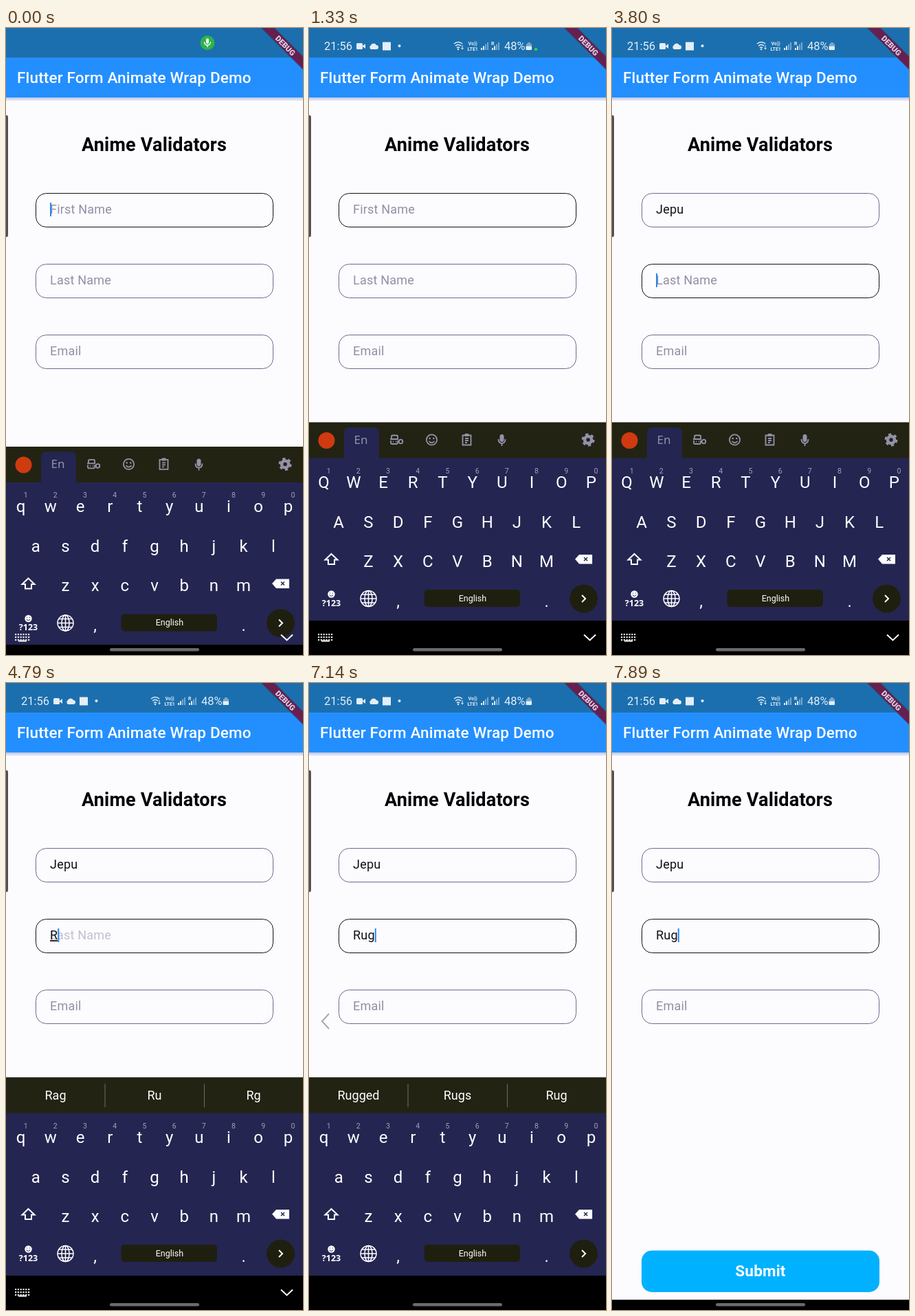
These frames come from a looping animation (432x912 px, 8000 ms). An HTML page:

```html
<!DOCTYPE html>
<html lang="en">
<head>
<meta charset="utf-8">
<title>Form demo</title>
<style>
  html, body { margin: 0; width: 100%; height: 100%; overflow: hidden; background: #fcfcff; }
  svg { display: block; width: 100vw; height: 100vh; font-family: Roboto, sans-serif; }
  text { white-space: pre; }
  .mid { text-anchor: middle; }
  .noto { font-family: 'Noto Sans', sans-serif; }
  .line { fill: none; stroke: #fff; stroke-width: 2; }
  .thin { stroke-width: 1.5; }
  .tool { fill: #9292ac; }
  .toolLine { fill: none; stroke: #9292ac; stroke-width: 1.8; }
  .field { font-size: 18px; letter-spacing: .2px; text-decoration-thickness: 1px; }
</style>
</head>
<body>
<svg id="stage" viewBox="0 0 432 912" preserveAspectRatio="none">
  <defs>
    <linearGradient id="shade" x2="0" y2="1">
      <stop stop-color="#b9c4e4"/><stop offset="1" stop-color="#f0f0fc"/>
    </linearGradient>
  </defs>
  <rect width="432" height="912" fill="#fcfcff"/>
  <rect y="101" width="432" height="5" fill="url(#shade)"/>
  <rect width="432" height="43" fill="#1c6fae"/>
  <rect y="43" width="432" height="58" fill="#238fff"/>
  <text x="16" y="80" font-size="22.5" font-weight="500" letter-spacing=".17" fill="#fff">Flutter Form Animate Wrap Demo</text>
  <text class="mid" x="215.5" y="179" font-size="27" font-weight="700" letter-spacing=".2">Anime Validators</text>
  <path d="M0 127h1q2 0 2 3v171q0 3-2 3h-1z" fill="#505050"/>

  <g id="status" fill="#e4eef6">
    <text x="22" y="32" font-size="16.5">21:56</text>
    <rect x="69" y="22" width="9" height="9" rx="1.5"/>
    <path d="M78 26l4-3v7l-4-3z"/>
    <path d="M90 31a3.5 3.5 0 0 1 0-6a4.5 4.5 0 0 1 8 0a3 3 0 0 1 0 6z"/>
    <rect x="107" y="20.5" width="12" height="12"/>
    <circle cx="131.5" cy="26" r="2"/>
    <g fill="none" stroke="#e4eef6" stroke-width="1.5">
      <path d="M211 23q6-5 12 0M213 26q4-3.5 8 0M215 29q2-2 4 0"/>
      <path d="M223 25v6M221.5 29l1.5 2l1.5-2" stroke-width="1"/>
    </g>
    <circle cx="217" cy="31" r="1.2"/>
    <text x="231.5" y="25" font-size="7" font-weight="700">Vo))</text>
    <text x="230.5" y="32.5" font-size="7" font-weight="700">LTE1</text>
    <text x="265" y="25" font-size="7" font-weight="700">R</text>
    <g id="signals"></g>
    <text x="284" y="32" font-size="16.5">48%</text>
    <path d="M316 23h2v-2h4v2h2v4h-8z" opacity=".45"/>
    <path d="M315.5 26.5h8.5v4.5q0 1-1 1h-6.5q-1 0-1-1z"/>
  </g>
  <g id="chip">
    <circle cx="293" cy="21.5" r="10.5" fill="#2fb34a"/>
    <rect x="291" y="15" width="4" height="8" rx="2" fill="#fff"/>
    <path d="M288.5 20q0 5 4.5 5t4.5-5M293 25v3" fill="none" stroke="#fff" stroke-width="1.3"/>
  </g>
  <circle id="dot" cx="330" cy="31" r="2.2" fill="#2fd04a"/>

  <g transform="translate(432 0) rotate(45)">
    <rect x="-70" y="28.5" width="140" height="15" fill="#000" opacity=".15"/>
    <rect x="-70" y="29.5" width="140" height="13" fill="#66204f"/>
    <text class="mid" y="40.2" font-size="11.2" font-weight="900" fill="#dccfe6">DEBUG</text>
  </g>

  <g id="fields"></g>
  <rect id="cursor" width="2" height="20" fill="#2b87f0"/>
  <path id="back" fill="none" stroke="#a9a9a4" stroke-width="2"/>

  <g id="submit">
    <rect x="43" y="825.5" width="346" height="60.5" rx="15" fill="#00b1ff"/>
    <text class="mid" x="216" y="863" font-size="22.5" font-weight="700" letter-spacing=".2" fill="#fff">Submit</text>
  </g>

  <rect id="backdrop" y="573.5" width="432" height="340" fill="#ccffff"/>
  <g id="keyboard">
    <rect y="573.5" width="432" height="52.5" fill="#232313"/>
    <rect y="625.5" width="432" height="290" fill="#252552"/>
    <rect y="862" width="432" height="60"/>
    <g id="tools">
      <circle cx="25.5" cy="600" r="12" fill="#d03a10"/>
      <path d="M51 626v-37q0-8 8-8h35q8 0 8 8v37z" fill="#252552"/>
      <text class="mid tool noto" x="75.5" y="605" font-size="17">En</text>
      <g class="toolLine">
        <path d="M120 598v-4q0-1.5 2-1.5h5q2 0 2 1.5v4M118 598h12M119 600v3q0 2 2 2h6q2 0 2-2v-3M122 601.5h1M126 601.5h1"/>
        <circle cx="133.5" cy="601.5" r="2.8"/>
        <circle cx="178.5" cy="599" r="7.6"/>
        <path d="M174.5 601q4 4.5 8 0"/>
        <path d="M223.5 592.5h12v14h-12zM227 597h5M227 600h5M227 603h3"/>
        <path d="M275.5 598q0 6 5 6t5-6M280.5 604v4"/>
        <circle cx="406" cy="599" r="5" stroke-width="4.5"/>
        <circle cx="406" cy="599" r="8" stroke-width="3" stroke-dasharray="4.2 4.178"/>
      </g>
      <g class="tool">
        <circle cx="175.7" cy="597" r="1.3"/><circle cx="181.3" cy="597" r="1.3"/>
        <rect x="226.5" y="590" width="6" height="4" rx="1"/>
        <rect x="277.5" y="591" width="6" height="11" rx="3"/>
      </g>
    </g>
    <g id="suggestions" font-size="18" fill="#fff">
      <path d="M144 583v34M288.5 583v34" stroke="#6c6c66"/>
    </g>
    <g id="keys" class="mid" fill="#fff" font-size="24"></g>
    <path class="line" d="M32.5 765l9 8.5h-4.5v6.5h-9v-6.5h-4.5z"/>
    <path d="M387 772.5l6-6.5h19v13.5h-19z" fill="#fff"/>
    <path d="M400 770l5 5m0-5l-5 5" stroke="#252552" stroke-width="1.5"/>
    <circle cx="32.5" cy="823.5" r="5.2" fill="#fff"/>
    <path d="M29.7 824.5q2.8 3.5 5.6 0M30.5 821.5v1M34.5 821.5v1" fill="none" stroke="#252552"/>
    <text class="mid noto" x="32.5" y="841" font-size="12.5" font-weight="600" fill="#fff">?123</text>
    <g class="line thin">
      <circle cx="86.5" cy="830" r="11.5"/><ellipse cx="86.5" cy="830" rx="5.5" ry="11.5"/>
      <path d="M75 830h23M77 824h19M77 836h19M86.5 818.5v23"/>
    </g>
    <g class="mid" fill="#fff" font-size="24"><text x="129.6" y="842">,</text><text x="345.6" y="842">.</text></g>
    <rect x="167.5" y="817" width="139.5" height="25" rx="5" fill="#1f1f10"/>
    <text class="mid" x="238" y="834" font-size="12.5" fill="#fff">English</text>
    <circle cx="399.5" cy="830" r="20.5" fill="#1f1f10"/>
    <path class="line" d="M397 825l5 5l-5 5"/>
  </g>

  <rect y="897" width="432" height="15"/>
  <g id="navIcons">
    <g id="navDots" fill="#e8e8e8"></g>
    <path class="line" d="M400 882.5l8.5 8l8.5-8"/>
  </g>
  <rect x="151" y="902" width="130" height="4.5" rx="2.2" fill="#6b6b6b"/>
</svg>
<script>
const LOOP = 8000;
const FOCUS_SECOND = 3500, DISMISS = 7150, DISMISS_TIME = 207;
const $ = id => document.getElementById(id);
const clamp = v => Math.max(0, Math.min(1, v));
const ramp = (t, start, duration) => clamp((t - start) / duration);
const mix = (a, b, k) => a + (b - a) * k;
const show = (node, visible) => node.style.display = visible ? '' : 'none';

function add(parent, tag, attributes, content = '') {
  const node = document.createElementNS('http://www.w3.org/2000/svg', tag);
  for (const name in attributes) node.setAttribute(name, attributes[name]);
  node.textContent = content;
  parent.append(node);
  return node;
}

const fields = [
  { hint: 'First Name', value: 'Jepu', y: 240.5, times: [1450, 1650, 1850, 2050], commit: FOCUS_SECOND },
  { hint: 'Last Name', value: 'Rug', y: 343.5, times: [4700, 5270, 5840], commit: 7000 },
  { hint: 'Email', value: '', y: 446.5, times: [], commit: 0 }
];
for (const field of fields) {
  const { y } = field;
  field.box = add($('fields'), 'rect', { x: 43.5, y, width: 345, height: 49, rx: 15, fill: 'none' });
  field.label = add($('fields'), 'text', { class: 'field', x: 64, y: y + 29.5, fill: '#9090a6' }, field.hint);
  field.text = add($('fields'), 'text', { class: 'field', x: 64, y: y + 29.5, fill: '#111' });
}

const words = [
  [1450, 'Jepu', 'Jet', 'Je'],
  [1850, 'Jepu', 'Jepulo', 'Jepunor'],
  [4700, 'Rag', 'Ru', 'Rg'],
  [5270, 'Ru', 'Run', 'Rub'],
  [5840, 'Rugged', 'Rugs', 'Rug']
];
const wordNodes = [72, 216, 360].map(x => add($('suggestions'), 'text', { class: 'mid', x, y: 606 }));

const letters = [];
['qwertyuiop', 'asdfghjkl', 'zxcvbnm'].forEach((row, r) => {
  [...row].forEach((letter, i) => {
    const x = [21.6, 43.2, 86.4][r] + 43.2 * i;
    letters.push([add($('keys'), 'text', { x, y: 669 + 57.5 * r }), letter]);
    if (!r) add($('keys'), 'text', { x: x + 7, y: 647.5, 'font-size': 10.5, fill: '#a2a2b4' }, (i + 1) % 10);
  });
});

for (const x of [250, 266])
  for (let i = 0; i < 4; i++)
    add($('signals'), 'rect', { x: x + i * 3, y: 29 - i * 2.7, width: 2, height: 3 + i * 2.7, opacity: i < 2 ? 1 : .45 });
for (let r = 0; r < 3; r++)
  for (let i = 0; i < 6; i++)
    add($('navDots'), 'rect', { x: 13 + i * 3.8, y: 881 + r * 4, width: 2.2, height: 2.2 });
add($('navDots'), 'rect', { x: 18, y: 890.5, width: 12, height: 2.2 });

function drawFields(t) {
  const focus = t < FOCUS_SECOND ? 0 : 1;
  fields.forEach((field, i) => {
    const typed = field.times.filter(time => time <= t).length;
    field.text.textContent = field.value.slice(0, typed);
    field.text.style.textDecorationLine = typed && t < field.commit ? 'underline' : 'none';
    field.label.style.opacity = typed ? 1 - ramp(t, field.times[0], 200) : 1;
    field.box.setAttribute('stroke', i === focus ? '#111' : '#6a6a90');
  });
  // Every keystroke restarts the blink.
  const { y, times, text } = fields[focus];
  const start = Math.max(focus ? FOCUS_SECOND : -300, ...times.filter(time => time <= t));
  $('cursor').setAttribute('x', 64 + (text.textContent ? text.getComputedTextLength() : 0));
  $('cursor').setAttribute('y', y + 13.5);
  show($('cursor'), (t - start) % 1000 < 500);
}

function drawKeyboard(t) {
  const rise = 36 * (1 - ramp(t, 0, 130)) ** 2;
  const leave = ramp(t, DISMISS, DISMISS_TIME);
  const drop = 338 * (1 - (1 - leave) ** 2);
  for (const id of ['backdrop', 'keyboard'])
    $(id).setAttribute('transform', `translate(0 ${rise + drop})`);
  $('keyboard').style.opacity = 1 - leave;
  show($('backdrop'), leave > 0 && leave < 1);
  show($('submit'), leave === 1);
  show($('navIcons'), t < 7100);

  const empty = t < 1450 || t >= FOCUS_SECOND && t < 4700;
  show($('tools'), empty);
  show($('suggestions'), !empty);
  const current = words.filter(([time]) => time <= t).pop() || words[0];
  wordNodes.forEach((node, i) => node.textContent = current[i + 1]);
  const upper = empty && t >= 200;
  for (const [node, letter] of letters) node.textContent = upper ? letter.toUpperCase() : letter;
}

function drawStatus(t) {
  const arrive = ramp(t, 700, 200);
  $('status').style.opacity = arrive;
  $('chip').style.opacity = 1 - arrive;
  $('dot').style.opacity = t < 3600 ? arrive : 0;
}

function drawBack(t) {
  const enter = ramp(t, 6950, 120), fold = ramp(t, 7140, 100);
  const x = mix(-10, 19, enter) + 3 * fold;
  const width = mix(10, 13, fold), half = mix(11, 7, fold);
  $('back').setAttribute('d', `M${x + width} ${492 - half}L${x} 492L${x + width} ${492 + half}`);
  $('back').style.opacity = enter * (1 - ramp(t, 7260, 120));
}

function frame(now) {
  const t = now % LOOP;
  drawFields(t);
  drawKeyboard(t);
  drawStatus(t);
  drawBack(t);
}

const origin = performance.now();
function tick() {
  frame(performance.now() - origin);
  requestAnimationFrame(tick);
}
tick();
</script>
</body>
</html>
```
